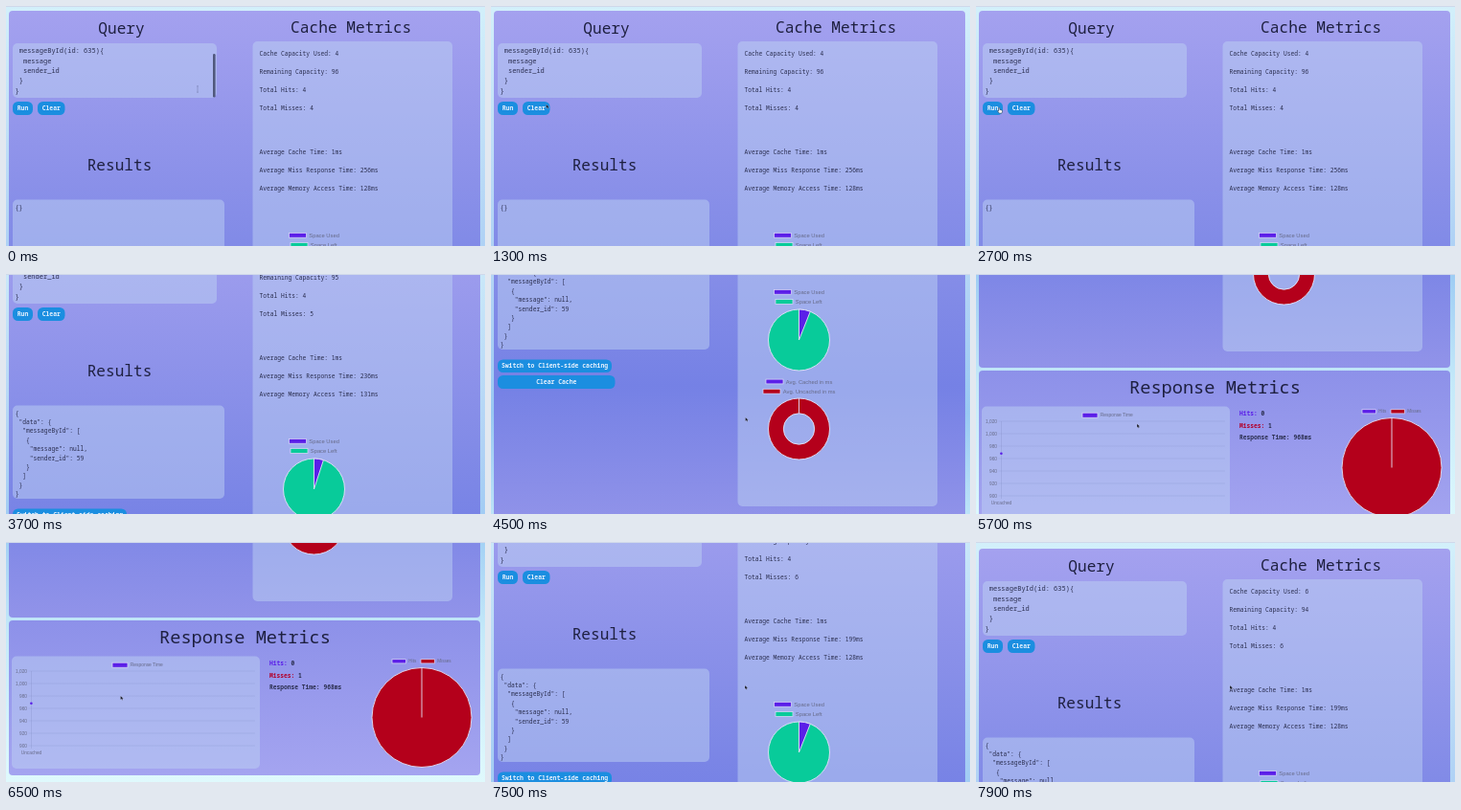
Animation of 500 by 251 pixels, one loop 8 s. Source, as an HTML page:

```html
<!DOCTYPE html>
<html lang="en">
<head>
<meta charset="utf-8">
<title>Cache dashboard</title>
<style>
html, body { margin: 0; width: 100%; height: 100%; overflow: hidden; background: #d9f3fb; }
svg { display: block; width: 500px; height: 251px; }
text { white-space: pre; fill: #2b2f50; }
.mono { font-family: "Roboto Mono", "Noto Sans Mono", "Liberation Mono", monospace; }
.sans { font-family: "Liberation Sans", Arial, sans-serif; fill: #666a88; }
.head { fill: #1e2040; }
.bold { font-weight: 600; }
.box { fill: #bed2f4; fill-opacity: .5; }
</style>
</head>
<body>
<svg id="stage" viewBox="0 0 500 251" xmlns="http://www.w3.org/2000/svg">
  <defs>
    <linearGradient id="sky" x2="0" y2="1">
      <stop offset="0" stop-color="#d5f2fb"/>
      <stop offset=".38" stop-color="#b0d2f5"/>
      <stop offset=".56" stop-color="#98c8f3"/>
      <stop offset=".75" stop-color="#c4e9f9"/>
      <stop offset="1" stop-color="#e2fbfd"/>
    </linearGradient>
    <linearGradient id="upper" x2="0" y2="1">
      <stop offset="0" stop-color="#a4a1ef"/>
      <stop offset=".5" stop-color="#828be7"/>
      <stop offset=".7" stop-color="#7581e5"/>
      <stop offset="1" stop-color="#9193e9"/>
    </linearGradient>
    <linearGradient id="lower" x2="0" y2="1">
      <stop offset="0" stop-color="#8d91e9"/>
      <stop offset="1" stop-color="#a4a4f0"/>
    </linearGradient>
  </defs>
  <g id="page"></g>
  <rect width="500" height="1" fill="#cfd8ea"/>
  <g id="cursor"></g>
</svg>
<script>
const NS = "http://www.w3.org/2000/svg";
const LOOP = 8000;
const PURPLE = "#5b1fe8", GREEN = "#08cb9a", RED = "#b4001b", BLUE = "#1b8ee0";
const SMALL = 6.27;
const page = document.getElementById("page");
const cursor = document.getElementById("cursor");

function add(tag, attrs, parent = page) {
  const el = document.createElementNS(NS, tag);
  for (const key in attrs) el.setAttribute(key, attrs[key]);
  parent.appendChild(el);
  return el;
}

function rect(x, y, x2, y2, rx, attrs) {
  return add("rect", { x, y, width: x2 - x, height: y2 - y, rx, ...attrs });
}

// y is the optical middle of the capitals
function label(str, x, y, size, cls = "mono", attrs = {}) {
  const el = add("text", { x, y: y + size * 0.35, "font-size": size, class: cls, ...attrs });
  el.textContent = str;
  return el;
}

function heading(str, x, y, size) {
  label(str, x, y, size, "mono head", { "text-anchor": "middle" });
}

function button(str, x, y, x2, y2) {
  rect(x, y, x2, y2, 5.5, { fill: BLUE });
  label(str, (x + x2) / 2, (y + y2) / 2, 6.4, "mono bold",
    { "text-anchor": "middle", style: "fill:#e6f1fd" });
}

function legend(str, x, y, w, h, color, size) {
  rect(x, y - h / 2, x + w, y + h / 2, 0, { fill: color, stroke: "#dcdcf8", "stroke-width": 0.7 });
  label(str, x + w + 2.8, y, size, "sans");
}

function wedge(cx, cy, r, share) {
  const a = share * 2 * Math.PI;
  return `M${cx} ${cy}V${cy - r}A${r} ${r} 0 0 1 ${cx + r * Math.sin(a)} ${cy - r * Math.cos(a)}Z`;
}

const edge = { stroke: "#e4e4f8", "stroke-width": 0.9 };

// upper panel
rect(0, -20, 500, 670, 0, { fill: "url(#sky)" });
rect(3, 5, 495, 481, 4, { fill: "url(#upper)" });
heading("Query", 120.5, 23, 16.1);
heading("Cache Metrics", 360.2, 22.5, 16.2);
heading("Results", 118.5, 166.5, 16.1);
rect(7, 39, 220, 96, 5, { class: "box" });
rect(257.5, 37, 466, 464, 5, { class: "box" });
rect(7, 202.5, 228, 300, 5, { class: "box" });
[" messageById(id: 635){", "  message", "  sender_id", " }", "}"]
  .forEach((s, i) => label(s, 9.5, 47 + i * 10.3, 7.02));
const thumb = rect(216, 50, 218.6, 95.5, 1.3, { fill: "#50587c" });
button("Run", 7, 100, 28, 114);
button("Clear", 33, 100, 61.5, 114);
button("Switch to Client-side caching", 7, 310.5, 126, 324);
button("Clear Cache", 7, 327, 129.5, 341);

const empty = label("{}", 9.8, 210.5, SMALL);
const answer = ["{", ' "data": {', '  "messageById": [', "   {", '    "message": null,',
  '    "sender_id": 59', "   }", "  ]", " }", "}"]
  .map((s, i) => label(s, 9.8, 210.5 + i * 9.4, SMALL));

const rows = [50, 69, 87.7, 106.5, 153, 171.7, 190.5].map(y => label("", 264.5, y, SMALL));

legend("Space Used", 295.5, 239.8, 18, 4.8, PURPLE, 5.8);
legend("Space Left", 297, 250, 18, 4.8, GREEN, 5.8);
add("circle", { cx: 321.5, cy: 290, r: 32, fill: GREEN, ...edge });
const used = add("path", { fill: PURPLE, ...edge });

legend("Avg. Cached in ms", 287, 333.5, 18, 4.8, PURPLE, 5.8);
legend("Avg. Uncached in ms", 284, 343.7, 18, 4.8, RED, 5.8);
add("path", {
  d: "M321.5 351a32 32 0 1 1 0 64a32 32 0 1 1 0 -64zM321.5 366.8a16.2 16.2 0 1 0 0 32.4a16.2 16.2 0 1 0 0 -32.4z",
  fill: RED, ...edge
});
add("path", { d: "M321.5 351v15.8", ...edge });

// lower panel
rect(3, 484, 495, 646, 4, { fill: "url(#lower)" });
heading("Response Metrics", 249.5, 501, 18.65);
rect(6, 521.5, 265, 639, 5, { class: "box" });
legend("Response Time", 111, 530.7, 16, 5, PURPLE, 4.9);
for (let i = 0; i < 7; i++) {
  const y = 537 + i * 13;
  rect(23.5, y - 0.25, 260, y + 0.25, 0, { fill: "#6f78b0", "fill-opacity": 0.32 });
  label((1020 - i * 20).toLocaleString("en-US"), 22, y, 4.8, "sans", { "text-anchor": "end" });
}
rect(26.2, 537, 26.7, 618, 0, { fill: "#6f78b0", "fill-opacity": 0.4 });
label("Uncached", 26.5, 622.3, 4.8, "sans", { "text-anchor": "middle" });
add("circle", { cx: 26.4, cy: 570.8, r: 1.3, fill: PURPLE });

[["Hits:", "0", PURPLE], ["Misses:", "1", "#b3002c"], ["Response Time:", "968ms", "#2b2f50"]]
  .forEach(([name, value, color], i) => {
    const el = label("", 275, 529 + i * 12.5, SMALL, "mono bold");
    add("tspan", { style: "fill:" + color }, el).textContent = name;
    add("tspan", {}, el).textContent = " " + value;
  });
legend("Hits", 403, 526.8, 14.5, 4.2, PURPLE, 4.6);
legend("Misses", 433, 526.8, 14.5, 4.2, RED, 4.6);
add("circle", { cx: 434, cy: 585.5, r: 52, fill: RED, ...edge });
add("path", { d: "M434 533.5v52", ...edge });

// pointer shapes
const beam = add("path", {
  d: "M-1 -3.2h2M0 -3.2v6.4M-1 3.2h2", stroke: "#7a82b4", "stroke-width": 0.6, fill: "none"
}, cursor);
const hand = add("path", {
  d: "M-1.4 -2.4q.7 -.8 1.2 .2v1.6l2.2 .6q.8 .5 .4 1.8l-.7 1.4h-2.4l-1.8 -2.3q0 -.8 1.1 -.1z",
  fill: "#fff", stroke: "#20263c", "stroke-width": 0.5
}, cursor);
const arrow = add("path", {
  d: "M-1 -2v4l1 -.9l.7 1.4l.8 -.4l-.7 -1.3h1.4z",
  fill: "#11131f", stroke: "#dfe3fa", "stroke-width": 0.25
}, cursor);

// [time, values...]
const SCROLL = [[0, 0], [2900, 0], [3300, 18], [3700, 65], [4100, 142], [4500, 221], [4900, 284],
  [5100, 307], [5500, 366], [5900, 400], [6100, 402], [6500, 402], [6700, 394], [6900, 350],
  [7100, 262], [7300, 160], [7500, 70], [7700, 12], [7900, -2]];
const POINTER = [[0, 200, 87], [500, 200, 87], [900, 120, 97], [1500, 28, 109], [1900, 25, 109],
  [2900, 25, 109], [3500, 266, 152], [5300, 267, 152], [5900, 120, 162], [6500, 120.5, 163],
  [6900, 266, 152], [7900, 266, 152]];
const METRICS = [
  [0, 4, 4, 256, 128],
  [2900, 5, 5, 236, 131],
  [4100, 6, 6, 199, 128]
];

function tween(table, t) {
  const i = table.findIndex(k => k[0] > t);
  if (i < 0) return table[table.length - 1].slice(1);
  const a = table[i - 1], b = table[i];
  const p = (t - a[0]) / (b[0] - a[0]);
  return a.slice(1).map((v, n) => v + (b[n + 1] - v) * p);
}

const show = (el, on) => el.setAttribute("visibility", on ? "visible" : "hidden");

function draw(time) {
  // the screen refreshes every 200 ms
  const t = Math.max(0, Math.floor((time % LOOP - 100) / 200) * 200 + 100);
  const [scroll] = tween(SCROLL, t);
  const [px, py] = tween(POINTER, t);
  page.setAttribute("transform", `translate(0 ${-scroll})`);
  cursor.setAttribute("transform", `translate(${px} ${py})`);
  show(beam, t < 900);
  show(hand, t >= 1500 && t < 3100);
  show(arrow, (t >= 900 && t < 1500) || t >= 3900);
  thumb.setAttribute("opacity", Math.min(1, Math.max(0, (1100 - t) / 600)));

  const [, cap, miss, missTime, memTime] = METRICS.filter(m => m[0] <= t).pop();
  ["Cache Capacity Used: " + cap, "Remaining Capacity: " + (100 - cap), "Total Hits: 4",
    "Total Misses: " + miss, "Average Cache Time: 1ms",
    `Average Miss Response Time: ${missTime}ms`, `Average Memory Access Time: ${memTime}ms`]
    .forEach((s, i) => { if (rows[i].textContent !== s) rows[i].textContent = s; });
  used.setAttribute("d", wedge(321.5, 290, 32, cap / 100));

  const done = t >= 2900;
  show(empty, !done);
  answer.forEach(el => show(el, done));
}

const start = performance.now();
function frame() {
  draw(performance.now() - start);
  requestAnimationFrame(frame);
}
draw(0);
requestAnimationFrame(frame);
</script>
</body>
</html>
```
